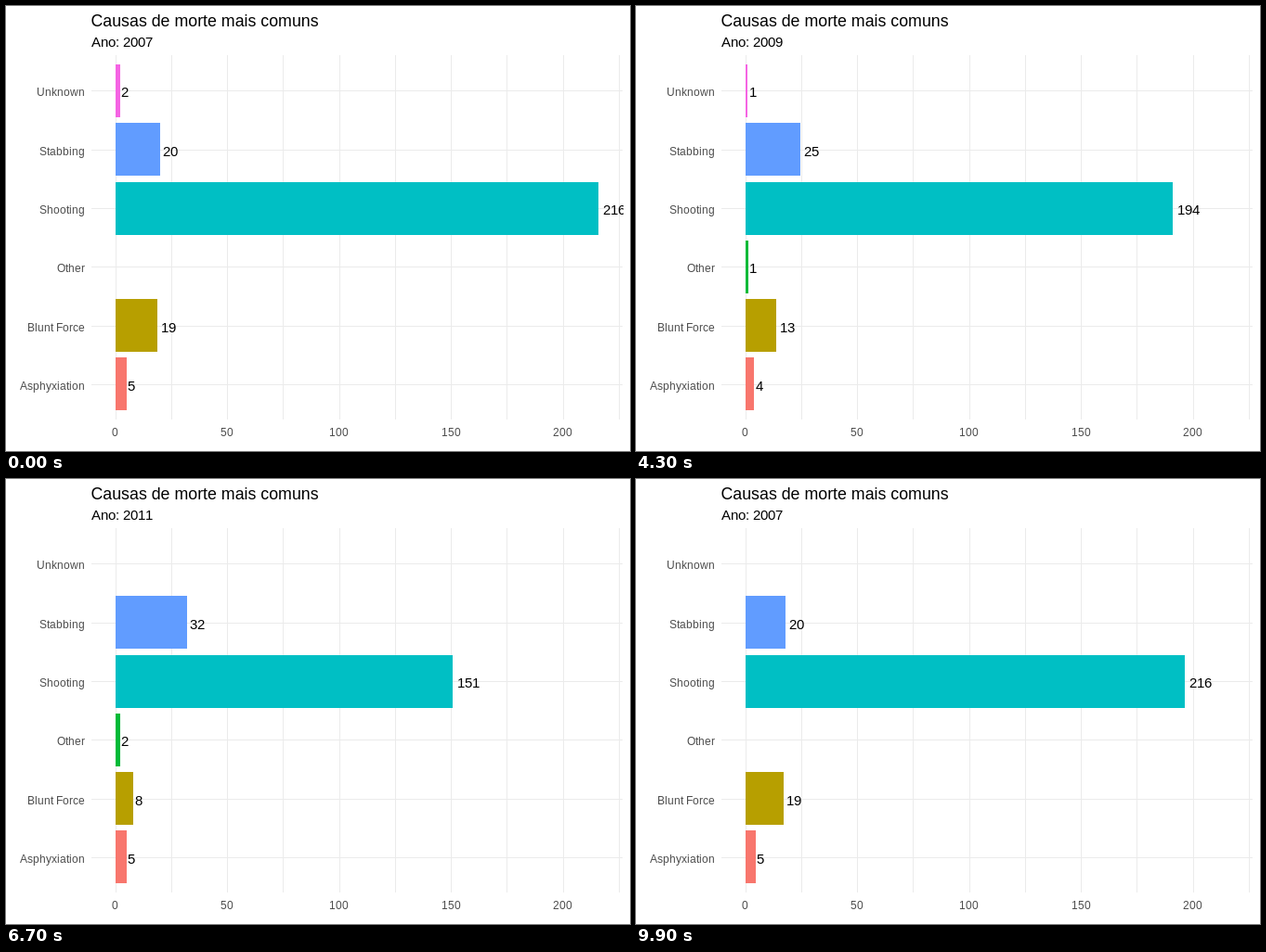
An HTML page for the animation above (10000 ms loop, 672x480 px).

```html
<!DOCTYPE html>
<html lang="pt">
<head>
<meta charset="utf-8">
<title>Causas de morte mais comuns</title>
<style>
  html, body { margin: 0; width: 100%; height: 100%; overflow: hidden; background: #fff; }
  svg { display: block; font-family: "Liberation Sans", Arial, sans-serif; font-kerning: none; }
  .title { font-size: 17.8px; }
  .value { font-size: 15px; }
  .axis { font-size: 12px; fill: #4d4d4d; }
  .grid { fill: #ebebeb; }
</style>
</head>
<body>
<svg id="stage" width="672" height="480" viewBox="0 0 672 480">
  <clipPath id="panel"><rect x="92" y="53" width="573" height="393"/></clipPath>
  <text class="title" x="91.5" y="22">Causas de morte mais comuns</text>
  <text class="value" id="year" y="44"></text>
</svg>
<script>
const LOOP = 10000, STEP = 100, STEPS = 8, FIRST_YEAR = 2007;

// One value per year; null where the cause was not recorded.
const causes = [
  { name: 'Unknown',      color: '#f564e3', values: [2, 6, 1, 1, null, null] },
  { name: 'Stabbing',     color: '#619cff', values: [20, 14, 25, 23, 32, 5] },
  { name: 'Shooting',     color: '#00bfc4', values: [216, 192, 194, 171, 151, 61] },
  { name: 'Other',        color: '#00ba38', values: [null, null, 1, 3, 2, null] },
  { name: 'Blunt Force',  color: '#b79f00', values: [19, 9, 13, 21, 8, 5] },
  { name: 'Asphyxiation', color: '#f8766d', values: [5, 8, 4, 4, 5, 2] }
];
const YEARS = causes[0].values.length;

const stage = document.getElementById('stage');
const yearText = document.getElementById('year');
const pen = document.createElement('canvas').getContext('2d');
const xOf = v => 117.7 + 2.409 * v;
const barTop = i => Math.round(63 + 63.25 * i);
const rowLine = i => Math.floor(91.7 + 63.35 * i);

function add(parent, tag, attrs) {
  const el = document.createElementNS('http://www.w3.org/2000/svg', tag);
  for (const key in attrs) el.setAttribute(key, attrs[key]);
  return parent.appendChild(el);
}

// Sets text with whole-pixel letter advances; align is the share of its width left of x.
function write(el, text, x, align, size) {
  pen.font = size + 'px "Liberation Sans", Arial, sans-serif';
  const steps = [...text].map(ch => Math.round(pen.measureText(ch).width));
  const width = steps.reduce((sum, w) => sum + w, 0);
  let pos = Math.round(x - align * width);
  el.setAttribute('x', steps.map(w => (pos += w) - w).join(' '));
  el.textContent = text;
}

for (let v = 0; v <= 225; v += 25) {
  add(stage, 'rect', { class: 'grid', x: Math.round(xOf(v)), y: 53, width: 1, height: 393 });
  if (v % 50 === 0) {
    write(add(stage, 'text', { class: 'axis', y: 464 }), String(v), xOf(v), 0.5, 12);
  }
}
causes.forEach((c, i) => {
  const y = rowLine(i);
  add(stage, 'rect', { class: 'grid', x: 92, y, width: 572, height: 1 });
  write(add(stage, 'text', { class: 'axis', y: y + 6 }), c.name, 85, 1, 12);
});

const plot = add(stage, 'g', { 'clip-path': 'url(#panel)' });
causes.forEach((c, i) => {
  c.bar = add(plot, 'rect', { x: 118, y: barTop(i), height: 57, fill: c.color });
});
causes.forEach((c, i) => {
  c.label = add(plot, 'text', { class: 'value', y: rowLine(i) + 7 });
});

function draw(t) {
  const from = Math.floor((t + 100) / 1700);
  const to = (from + 1) % YEARS;
  const start = Math.min(900 + 1700 * from, 9300);
  const p = Math.max(0, Math.floor((t - start) / STEP) + 1) / STEPS;
  const nearest = p < 0.5 ? from : to;

  write(yearText, 'Ano: ' + (FIRST_YEAR + nearest), 92, 0, 15);
  for (const { values, bar, label } of causes) {
    const a = values[from];
    const shown = a !== null;
    bar.style.display = label.style.display = shown ? '' : 'none';
    if (!shown) continue;
    // A bar without a next value stays put until the change is over.
    const b = values[to] ?? a;
    const x = xOf(a + (b - a) * p);
    bar.setAttribute('width', Math.round(x) - 118);
    write(label, String(nearest === from ? a : b), x, -0.2, 15);
  }
}

const t0 = performance.now();
function tick() {
  draw((performance.now() - t0) % LOOP);
  requestAnimationFrame(tick);
}
tick();
</script>
</body>
</html>
```
